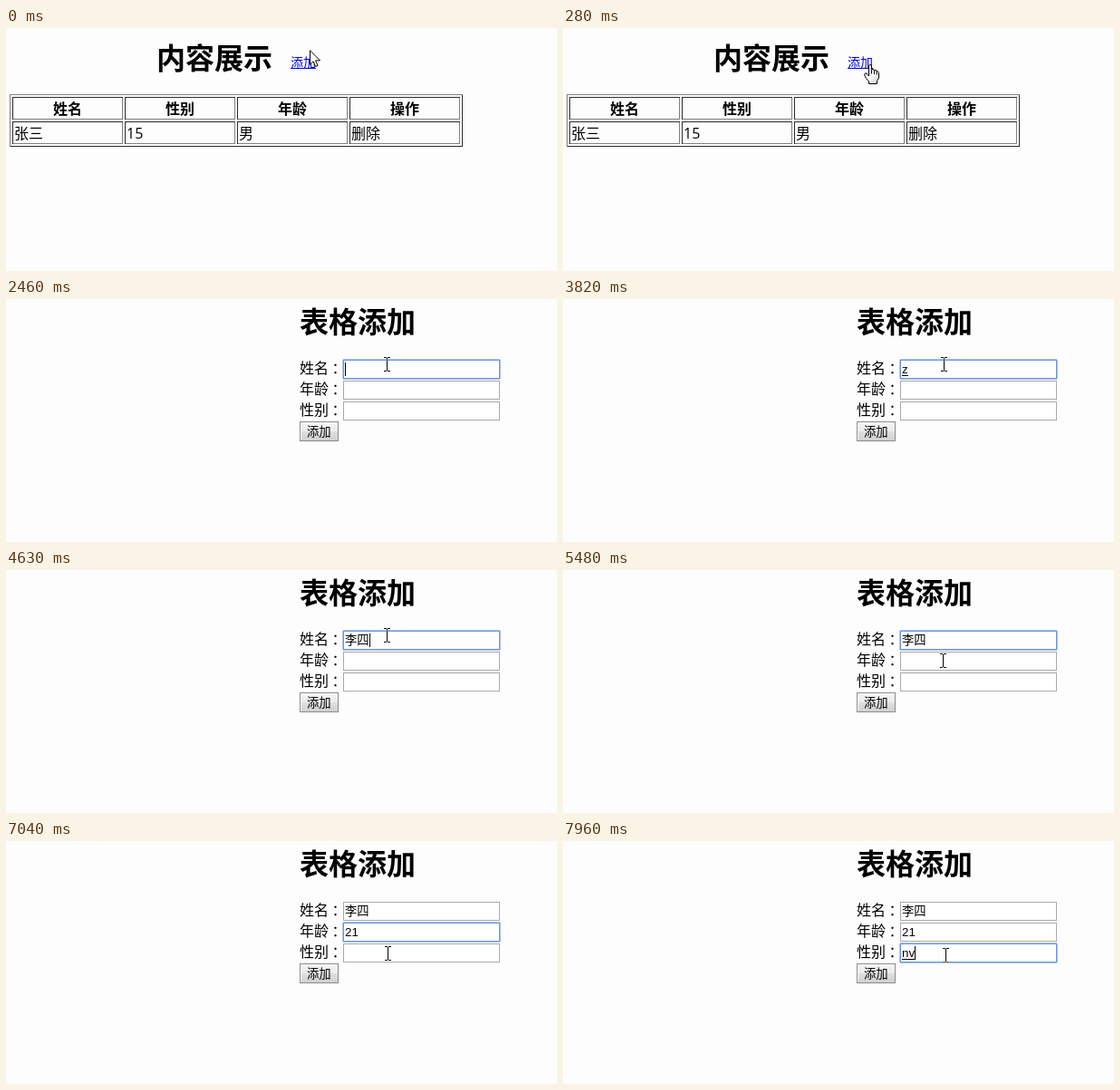
Write an HTML page that moves like this. It is 608x268 px and loops after 8000 ms.

```html
<!DOCTYPE html>
<html lang="zh-CN">
<head>
<meta charset="utf-8">
<title>表格添加</title>
<style>
  html, body { margin: 0; width: 100%; height: 100%; overflow: hidden; background: #fdfdfd; }
  svg { display: block; width: 608px; height: 268px; background: #fdfdfd; isolation: isolate; }
  text { font: 16px "Noto Sans CJK SC", "Noto Sans CJK", sans-serif; white-space: pre; }
  .title { font-size: 32px; font-weight: bold; }
  .head { font-weight: bold; text-anchor: middle; }
  .num { font-family: "Open Sans", "Noto Sans", sans-serif; }
  .link { font-size: 14px; fill: #00e; }
  .small { font-size: 13.333px; }
  .value { font: 13.333px "Liberation Sans", Arial, "Noto Sans CJK SC", "Noto Sans CJK", sans-serif; }
  .crisp { shape-rendering: crispEdges; }
  #ibeam { mix-blend-mode: difference; }
</style>
</head>
<body>
<svg viewBox="0 0 608 268">
  <defs>
    <linearGradient id="face" x2="0" y2="1">
      <stop offset="0" stop-color="#f4f4f4"/>
      <stop offset=".5" stop-color="#ebebeb"/>
      <stop offset=".5" stop-color="#dfdfdf"/>
      <stop offset="1" stop-color="#d0d0d0"/>
    </linearGradient>
    <linearGradient id="skin" x2="1" y2="1">
      <stop offset=".5" stop-color="#fff"/>
      <stop offset="1" stop-color="#c8c8c8"/>
    </linearGradient>
  </defs>

  <g id="list">
    <text class="title" x="166" y="45">内容展示</text>
    <text class="link" x="314" y="43">添加</text>
    <rect class="crisp" x="314" y="44" width="28" height="1" fill="#00e"/>
    <g id="table"></g>
  </g>

  <g id="form">
    <text class="title" x="324" y="37">表格添加</text>
    <g id="rows"></g>
    <rect x="324.5" y="135.5" width="42" height="21" fill="url(#face)" stroke="#8c8c8c"/>
    <path class="crisp" d="M325.5 155V136.5H366" fill="none" stroke="#fafafa"/>
    <text class="small" x="332" y="151">添加</text>
    <g id="ring" fill="none">
      <rect x="371.5" y="66.5" width="174" height="22" rx="1.5" stroke="#a9c4f3"/>
      <rect x="372.5" y="67.5" width="172" height="20" stroke="#6b95df"/>
    </g>
    <rect id="compose" class="crisp" x="374" height="1"/>
    <rect id="caret" class="crisp" width="1" height="15"/>
  </g>

  <g id="arrow">
    <path d="M.5 .8V16.2L4.1 12.8 6.6 18.5 9 17.5 6.6 11.9H11.5Z" fill="#fff" stroke="#000"/>
  </g>
  <g id="hand">
    <path d="M5.5 13V2Q5.5 .5 7 .5T8.5 2V6.5Q8.7 5.5 10 5.5T11.4 7Q11.7 6.3 13 6.5T14.2 8Q14.6 7.5 15.5 7.9T16.5 9.5V15L14.5 18.5V21.5H5.5V19L2.5 15.5 .8 12.2Q.3 10 2 9.8T4 11.5Z"
      fill="url(#skin)" stroke="#000"/>
    <path d="M8.5 7V10.5M11.4 7V11M14.2 8V11.5" fill="none" stroke="#000"/>
  </g>
  <g id="ibeam">
    <path class="crisp" d="M-3-8H0V-7H1V-8H4V-7H1V7H4V8H1V7H0V8H-3V7H0V-7H-3Z" fill="#fff"/>
  </g>
</svg>

<script>
const LOOP = 8000, ROW = 23, TEXT_X = 374;
const $ = id => document.getElementById(id);

function add(parent, tag, attrs, text = '') {
  const el = document.createElementNS('http://www.w3.org/2000/svg', tag);
  for (const k in attrs) el.setAttribute(k, attrs[k]);
  el.textContent = text;
  parent.append(el);
  return el;
}

// Bevelled one pixel frame
function bevel(parent, x, y, w, h, topLeft, bottomRight) {
  const r = x + w - .5, b = y + h - .5;
  const line = (d, stroke) => add(parent, 'path', { d, stroke, fill: 'none', class: 'crisp' });
  line(`M${x + .5} ${y + h}V${y + .5}H${x + w}`, topLeft);
  line(`M${x + 1} ${b}H${r}V${y + 1}`, bottomRight);
}

const table = $('table'), light = '#808080', dark = '#2c2c2c';
bevel(table, 4, 73, 500, 58, light, dark);
[['姓名', '张三'], ['性别', '15'], ['年龄', '男'], ['操作', '删除']].forEach(([head, cell], i) => {
  const x = 7 + 124 * i;
  bevel(table, x, 76, 122, 25, dark, light);
  bevel(table, x, 103, 122, 25, dark, light);
  add(table, 'text', { class: 'head', x: x + 61, y: 95 }, head);
  add(table, 'text', { class: cell === '15' ? 'num' : '', x: x + 2, y: 122 }, cell);
});

const values = ['姓名', '年龄', '性别'].map((label, i) => {
  const dy = ROW * i, rows = $('rows');
  add(rows, 'text', { x: 324, y: 82 + dy }, label);
  add(rows, 'text', { x: 359.5, y: 82 + dy }, '：');
  add(rows, 'rect', { x: 372.5, y: 67.5 + dy, width: 172, height: 20, fill: '#fff', stroke: '#a9a9a9' });
  return add(rows, 'text', { class: 'value', x: TEXT_X, y: 82 + dy });
});

// Each step changes only what it names
const start = { page: 'list', cursor: 'arrow', at: [335, 24], focus: -1, caret: false, ime: false, name: '', age: '', sex: '' };
const steps = [
  [0, {}],
  [130, { cursor: 'hand', at: [332, 35] }],
  [280, { at: [332, 40] }],
  [1520, { page: 'form', cursor: 'ibeam', at: [338, 41] }],
  [1950, { at: [346, 47] }],
  [2070, { at: [376, 63] }],
  [2190, { at: [405, 77] }],
  [2340, { at: [420, 72] }],
  [2460, { focus: 0, caret: true }],
  [2920, { caret: false }],
  [3390, { name: 'z', ime: true, caret: true }],
  [3820, { caret: false }],
  [3940, { name: '', caret: true }],
  [4210, { name: 'l' }],
  [4360, { name: 'lis' }],
  [4480, { name: 'lisi' }],
  [4630, { name: '李四', ime: false }],
  [5060, { caret: false }],
  [5180, { at: [424, 73] }],
  [5330, { at: [418, 99] }],
  [5480, { at: [419, 100] }],
  [5600, { focus: 1, caret: true }],
  [6190, { age: '2' }],
  [6340, { age: '21' }],
  [6770, { caret: false }],
  [6890, { at: [421, 118] }],
  [7040, { at: [421, 124] }],
  [7160, { focus: 2, caret: true, at: [422, 126] }],
  [7680, { caret: false }],
  [7800, { sex: 'n', ime: true, caret: true }],
  [7960, { sex: 'nv' }]
];
let last = start;
const states = steps.map(([time, change]) => (last = { ...last, ...change, time }));

const show = (id, on) => $(id).setAttribute('display', on ? 'inline' : 'none');

function render(s) {
  for (const id of ['list', 'form']) show(id, s.page === id);
  for (const id of ['arrow', 'hand', 'ibeam']) show(id, s.cursor === id);
  $(s.cursor).setAttribute('transform', `translate(${s.at})`);

  [s.name, s.age, s.sex].forEach((v, i) => values[i].textContent = v);
  const focused = s.focus >= 0, dy = ROW * s.focus;
  const width = focused ? Math.round(values[s.focus].getComputedTextLength()) : 0;
  show('ring', focused);
  show('caret', focused && s.caret);
  show('compose', focused && s.ime);
  $('ring').setAttribute('transform', `translate(0 ${dy})`);
  $('caret').setAttribute('x', TEXT_X + width);
  $('caret').setAttribute('y', 70 + dy);
  $('compose').setAttribute('y', 84 + dy);
  $('compose').setAttribute('width', width);
}

let shown;
function tick() {
  const t = performance.now() % LOOP;
  const state = states.findLast(s => s.time <= t);
  if (state !== shown) render(shown = state);
  requestAnimationFrame(tick);
}
tick();
</script>
</body>
</html>
```
